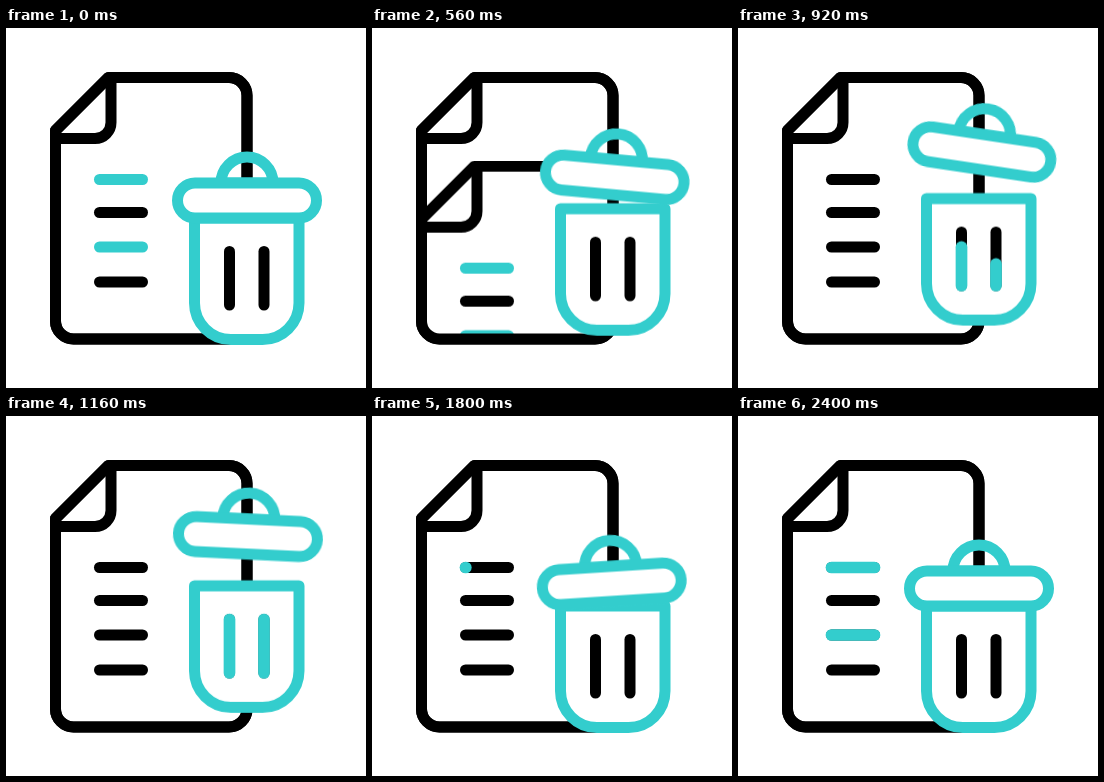
Animation of 360 by 360 pixels, one loop 2.48 s. Source, as an HTML page without scripts:

```html
<!DOCTYPE html>
<html lang="en">
<head>
<meta charset="utf-8">
<title>Delete document</title>
<style>
  html, body { margin: 0; width: 100%; height: 100%; overflow: hidden; background: #fff; }
  svg { display: block; width: 100vw; height: 100vh; }

  .ink, .teal { fill: #fff; stroke: #000; stroke-width: 11; stroke-linecap: round; stroke-linejoin: round; }
  .teal { stroke: #33cdcd; }
  .hollow { fill: none; }

  .slide, .body, .lift, .tilt, .write, .tint, .fill {
    animation: 2480ms linear infinite both;
  }
  .write, .tint, .fill { stroke-dasharray: 50 100; animation-delay: var(--wait, 0ms); }
  .tint, .fill { stroke-width: 11.7; }
  .slide { animation-name: slide; }
  .body { animation-name: body; }
  .lift { animation-name: lift; }
  .tilt { animation-name: tilt; transform-origin: 241px 192px; }
  .write { animation-name: write; }
  .tint { animation-name: tint; }
  .fill { animation-name: fill; }

  /* the old sheet drops out of the bottom */
  @keyframes slide {
    0% { transform: translateY(0); }
    9.68% { transform: translateY(0); animation-timing-function: cubic-bezier(.68, 0, .8, .8); }
    31.05%, 100% { transform: translateY(280px); }
  }

  @keyframes body {
    0% { transform: translateY(0); }
    16.13% { transform: translateY(0); animation-timing-function: cubic-bezier(.33, .4, .67, .85); }
    29.03% { transform: translateY(-15.5px); animation-timing-function: cubic-bezier(.33, .5, .67, 1); }
    43.55% { transform: translateY(-20.7px); animation-timing-function: cubic-bezier(.33, 0, .67, .5); }
    59.68% { transform: translateY(-11.5px); animation-timing-function: cubic-bezier(.33, .25, .67, .75); }
    70.16%, 100% { transform: translateY(0); }
  }

  @keyframes lift {
    0% { transform: translateY(0); }
    16.13% { transform: translateY(0); animation-timing-function: cubic-bezier(.33, .4, .67, .85); }
    29.03% { transform: translateY(-39px); animation-timing-function: cubic-bezier(.33, .5, .67, 1); }
    44.35% { transform: translateY(-52.5px); animation-timing-function: cubic-bezier(.33, 0, .67, .5); }
    59.68% { transform: translateY(-38.3px); animation-timing-function: cubic-bezier(.33, .22, .67, .72); }
    74.6%, 100% { transform: translateY(0); }
  }

  @keyframes tilt {
    0% { transform: rotate(0deg); }
    16.13% { transform: rotate(0deg); animation-timing-function: cubic-bezier(.33, .3, .67, .9); }
    29.03% { transform: rotate(9deg); animation-timing-function: ease-out; }
    31.45% { transform: rotate(9.5deg); animation-timing-function: cubic-bezier(.42, 0, .8, .6); }
    46.77% { transform: rotate(2.8deg); animation-timing-function: cubic-bezier(.33, .25, .67, .9); }
    59.68% { transform: rotate(-14deg); animation-timing-function: cubic-bezier(.4, 0, .8, .8); }
    75.8%, 100% { transform: rotate(0deg); }
  }

  @keyframes write {
    0%, 22.58% { stroke-dashoffset: 51; }
    32.26%, 100% { stroke-dashoffset: 0; }
  }

  @keyframes tint {
    0%, 72.18% { stroke-dashoffset: 51; }
    88.31%, 100% { stroke-dashoffset: 0; }
  }

  @keyframes fill {
    0%, 25.4% { stroke-dashoffset: 51; }
    41.53%, 49.11% { stroke-dashoffset: 0; }
    65.24%, 100% { stroke-dashoffset: 51; }
  }
</style>
</head>
<body>
<svg viewBox="0 0 360 360" role="img" aria-label="Document dropped into a bin">
  <defs>
    <path id="outline" d="M102.5 49.5H223a18 18 0 0 1 18 18V293a18 18 0 0 1-18 18H67.5a18 18 0 0 1-18-18V102.5Z"/>
    <g id="sheet">
      <use href="#outline"/>
      <path d="M105 49.5V94.5a16 16 0 0 1-16 16H49.5" fill="none"/>
    </g>
    <path id="row" d="M93.5 0h43" pathLength="50"/>
    <path id="bar" d="M0 277v-53.5" pathLength="50"/>
    <clipPath id="edge"><use href="#outline"/></clipPath>
  </defs>

  <use href="#sheet" class="ink"/>
  <g class="ink">
    <use href="#row" y="151.5" class="write"/>
    <use href="#row" y="184.5" class="write" style="--wait:40ms"/>
    <use href="#row" y="219" class="write" style="--wait:80ms"/>
    <use href="#row" y="254" class="write" style="--wait:120ms"/>
  </g>
  <g class="teal">
    <use href="#row" y="151.5" class="tint"/>
    <use href="#row" y="219" class="tint" style="--wait:125ms"/>
  </g>

  <g clip-path="url(#edge)">
    <g class="slide">
      <use href="#sheet" class="ink"/>
      <use href="#row" y="151.5" class="teal"/>
      <use href="#row" y="184.5" class="ink"/>
      <use href="#row" y="219" class="teal"/>
      <use href="#row" y="254" class="ink"/>
    </g>
  </g>
  <use href="#outline" class="ink hollow"/>

  <g class="body">
    <path class="teal" d="M188.5 190H293V275a36.5 36.5 0 0 1-36.5 36.5H225a36.5 36.5 0 0 1-36.5-36.5Z"/>
    <g class="ink">
      <use href="#bar" x="223.5"/>
      <use href="#bar" x="258"/>
    </g>
    <g class="teal">
      <use href="#bar" x="223.5" class="fill"/>
      <use href="#bar" x="258" class="fill" style="--wait:125ms"/>
    </g>
  </g>

  <g class="lift">
    <g class="tilt teal">
      <path class="hollow" d="M215 155a26 26 0 0 1 52 0Z"/>
      <rect x="171.5" y="155" width="139" height="35" rx="17.5"/>
    </g>
  </g>
</svg>
</body>
</html>
```
